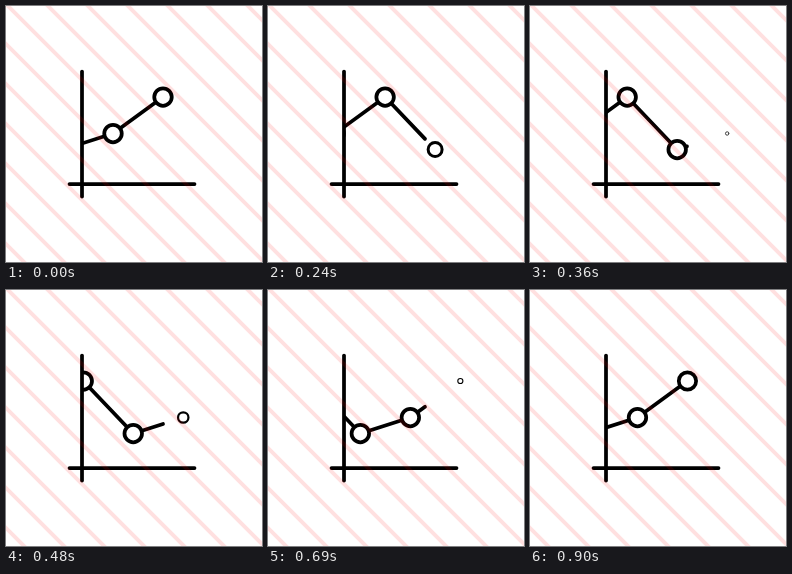
An HTML page with a canvas that plays this animation: 256x256 px, repeating every 930 ms.

```html
<!DOCTYPE html>
<html>
<head>
<meta charset="utf-8">
<style>
  html, body { margin: 0; height: 100%; overflow: hidden; background: #fff; }
  canvas { display: block; }
</style>
</head>
<body>
<canvas id="stage" width="256" height="256"></canvas>
<script>
const ctx = document.getElementById('stage').getContext('2d');
const LOOP = 930, STEP = 30, SPEED = 4.985;
const LEFT = 77, RIGHT = 157, GAP = 50, WEIGHT = 3.75;
const heights = [143.5, 127.5, 91];

function line(x1, y1, x2, y2) {
  ctx.beginPath();
  ctx.moveTo(x1, y1);
  ctx.lineTo(x2, y2);
  ctx.stroke();
}

function drawStripes() {
  ctx.strokeStyle = 'rgba(255, 0, 0, 0.12)';
  ctx.lineWidth = 4;
  for (let x = -278; x < 256; x += 40) line(x - 10, -10, x + 270, 270);
}

function drawChart(shift) {
  const points = [];
  for (let i = 0; i < 7; i++) {
    points.push({ x: 57 + i * GAP - shift, y: heights[i % 3] });
  }

  ctx.save();
  ctx.beginPath();
  ctx.rect(LEFT, 0, 256, 256);
  ctx.clip();

  // The line stops at RIGHT; markers grow while they approach it.
  ctx.lineWidth = WEIGHT;
  for (let i = 1; i < points.length; i++) {
    const a = points[i - 1], b = points[i];
    if (a.x >= RIGHT) break;
    const part = Math.min(1, (RIGHT - a.x) / GAP);
    line(a.x, a.y, a.x + GAP * part, a.y + (b.y - a.y) * part);
  }
  for (const { x, y } of points) {
    const scale = Math.min(1, (RIGHT + GAP - x) / GAP);
    if (scale <= 0) break;
    ctx.lineWidth = WEIGHT * scale;
    ctx.beginPath();
    ctx.arc(x, y, 8.75 * scale, 0, Math.PI * 2);
    ctx.fill();
    ctx.stroke();
  }
  ctx.restore();
}

function draw(now) {
  const shift = Math.floor(now % LOOP / STEP) * SPEED;
  ctx.fillStyle = '#fff';
  ctx.fillRect(0, 0, 256, 256);
  ctx.strokeStyle = '#000';
  ctx.lineCap = 'round';
  drawChart(shift);
  ctx.lineWidth = WEIGHT;
  line(76, 65.5, 76, 190.5);
  line(63.5, 178, 188.5, 178);
  drawStripes();
  requestAnimationFrame(draw);
}
requestAnimationFrame(draw);
</script>
</body>
</html>
```
